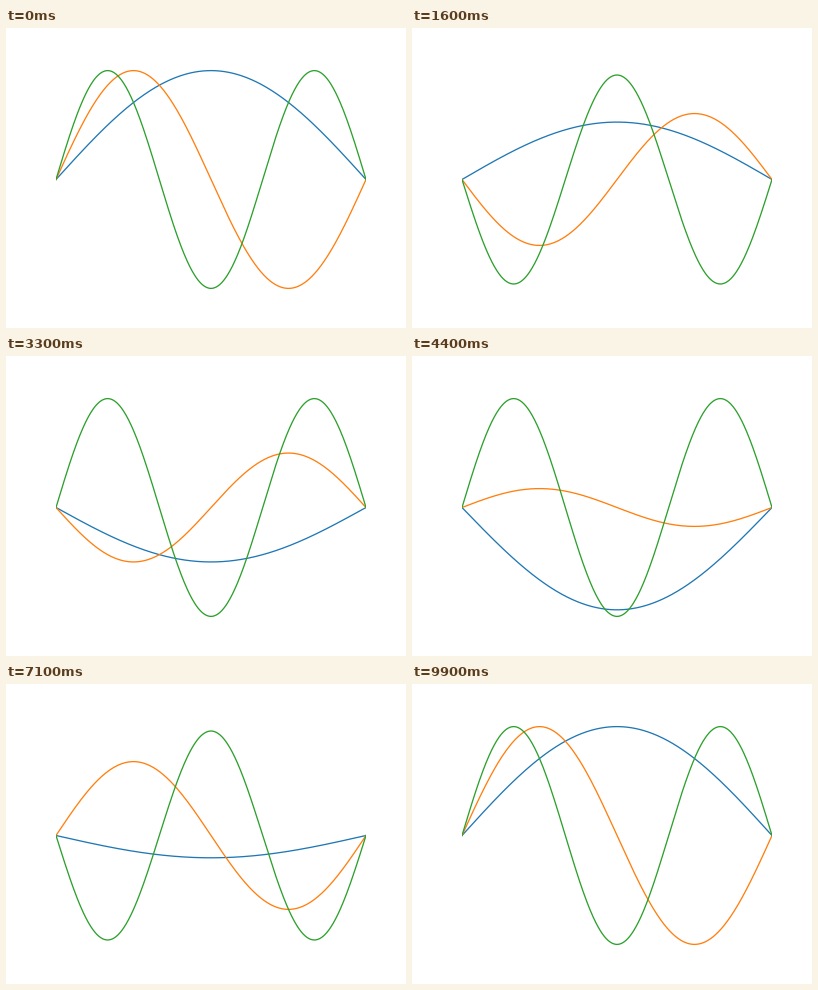
Animation of 400 by 300 pixels, one loop 10000 ms. Source, as a matplotlib script:

```python
import numpy as np
import matplotlib.pyplot as plt
from matplotlib.animation import FuncAnimation

FRAMES = 100
INTERVAL = 100
LEVELS = (1, 2, 3)

x = np.linspace(0, 1, 500)
# Both ends of the period are included, so the last frame equals the first.
phases = np.linspace(0, 2 * np.pi, FRAMES)


def wave(n, phase):
    """Real part of the n-th stationary state in a box of unit width."""
    return np.sqrt(2) * np.sin(n * np.pi * x) * np.cos(n**2 * phase)


fig, ax = plt.subplots(figsize=(6.4, 4.8), dpi=62.5)
fig.subplots_adjust(left=0.125, right=0.9, bottom=0.11, top=0.88)
ax.set_xlim(0, 1)
ax.set_ylim(-1.5, 1.5)
ax.axis("off")

colors = ("tab:blue", "tab:orange", "tab:green")
lines = [ax.plot(x, wave(n, 0), color=c, lw=1.5)[0]
         for n, c in zip(LEVELS, colors)]


def update(i):
    for n, line in zip(LEVELS, lines):
        line.set_ydata(wave(n, phases[i]))
    return lines


anim = FuncAnimation(fig, update, frames=FRAMES, interval=INTERVAL,
                     repeat=True, repeat_delay=0)
plt.show()
```
